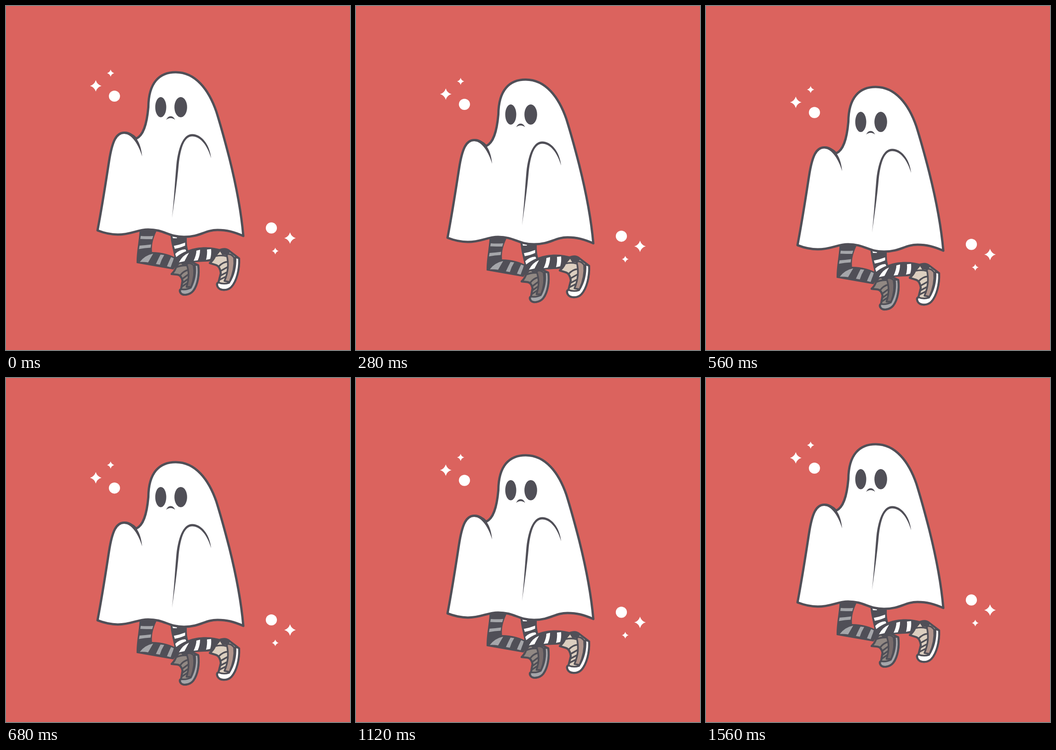
An HTML page with a canvas for the animation above (1.6 s loop, 748x748 px).

```html
<!DOCTYPE html>
<html lang="en">
<head>
<meta charset="utf-8">
<title>Floating ghost</title>
<style>
  html, body { margin: 0; width: 100%; height: 100%; overflow: hidden; background: #db635e; }
  canvas { display: block; width: 748px; height: 748px; }
</style>
</head>
<body>
<canvas id="stage" width="748" height="748"></canvas>
<script>
const ctx = document.getElementById('stage').getContext('2d');
const SIZE = 748, STEP = 40, STEPS = 40, PEAK = 19;
const RED = '#db635e', DARK = '#504f57', WHITE = '#fff', GRAY = '#a5a6aa';
const GHOST_DROP = 43.5, SPARKLE_DROP = 48.4;

const P = d => new Path2D(d);

const body = P(`M199 488 C210 430 217 383 224 338 C231 293 240 275.5 257 275.5
  C268 275.5 276 281 283 288.5 C298 282 306 259 309.5 220 C310 166 334 144 369 144
  C412 144 441 182 457.5 230 C467.5 262 476.500 295 485.500 330 C500 388 511 442 516 500
  C495 491 480 487 460 487 C432 487 423 502 387 502 C352 502 345 486 309 486
  C285 486 273 497 243 497 C226 497 212 493 199 488 Z`);
const creases = P(`M257 273 C275 273 293 290 296 327 C289 303 274 278 257 278 Z
  M361 461 C365 425 367.500 380 370.500 345 C375.500 300 388 278.5 405 278.5
  C424 278.5 443 300 446 331 C437 300 421 283.5 405 283.5
  C389 283.5 380 305 375.500 345 C372 385 366 425 361 461 Z`);
const mouth = P('M348.5 247.5 C352 237 364 237 367.5 247.5 C362 242.5 354 242.5 348.5 247.5 Z');

const backLeg = P(`M291 478 C290 510 284 530 284 559 L364 573 L378 552
  C358 540 338 535 317.500 535 C316 517 321 503 327 490 L327 478 Z`);
const backStripes = P(`M293 500 Q306 501 320 500 L318 507 Q305 507 292 506.5 Z
  M290.500 521 Q303 520 315.500 518.500 L314.500 525.500 Q302 526 289 528.500 Z
  M291 556.500 Q302 542 320 538.500 L309 557.500 Q300 556 291 556.500 Z
  M326 561 Q332 548 336 540.500 L344 541.500 Q338 551 334.500 562.500 Z
  M350 566 Q355 554 359 546 L366 549 Q361 558 358 568 Z`);
const frontLeg = P(`M357 488 C357.500 510 362 525 366 544 L360 566 L376 561
  C400 556 424 557 446 555 L470 530 C448 523 420 522 396 531
  C392 518 393 506 394 488 Z`);
const frontStripes = P(`M362 501 L372 502 L371.500 505 L363 505 Z
  M365 521.500 Q378 519 389.500 514.500 L389.500 521 Q379 526 367 528 Z
  M368 539 Q377 529.500 390 529 L392 533 Q380 538 370 546 Z
  M376 557.500 Q384 542 398 536.500 Q393 545 388 555 Z
  M408 554 Q414 541 414 532 L422 530 Q422 542 417 553 Z
  M435 552 Q438 540 437 529.500 L446 528.500 Q447 540 444 550 Z
  M461 534 L468 533.500 L467.500 540 L461.500 538.500 Z`);

const shoe = {
  outline: P(`M443 559 Q451 553 455 543 L466 530 Q478 526 486 533 L507 549
    C508 572 502 598 490 611 C481 620 465 619 460.500 611 C457 605 459 602 462 601
    L467 581 C466 572 463 565 456 563 Z`),
  quarter: P(`M480 541 Q487 536 496 547 C498 568 493 585 486 600 L475 598
    C482 582 485 562 480 541 Z`),
  sole: P(`M499 546 L507 549 C508 572 502 598 490 611 C481 620 465 619 460.500 611
    Q458 604 461 601 Q473 606 485 602 C494 588 500 568 499 546 Z`),
  heel: P('M464 531 Q477 525 488 535 L480 542 L470 541 Z'),
  lines: P(`M455 544 Q468 541 479 544 M463 566 Q471 557 482 556
    M467 576 L481 568 M467 586 L480 579 M465 595 L477 589`)
};
const backShoeMatrix = new DOMMatrix([0.919, -0.166, 0.075, 0.852, -89, 180.2]);

function fill(path, color) {
  ctx.fillStyle = color;
  ctx.fill(path);
}

function stroke(path, width) {
  ctx.strokeStyle = DARK;
  ctx.lineWidth = width;
  ctx.stroke(path);
}

function ellipse(x, y, rx, ry, color) {
  ctx.fillStyle = color;
  ctx.beginPath();
  ctx.ellipse(x, y, rx, ry, 0, 0, Math.PI * 2);
  ctx.fill();
}

function star(x, y, r) {
  const c = r * 0.23;
  ctx.fillStyle = WHITE;
  ctx.beginPath();
  ctx.moveTo(x, y - r);
  ctx.quadraticCurveTo(x + c, y - c, x + r, y);
  ctx.quadraticCurveTo(x + c, y + c, x, y + r);
  ctx.quadraticCurveTo(x - c, y + c, x - r, y);
  ctx.quadraticCurveTo(x - c, y - c, x, y - r);
  ctx.fill();
}

function drawShoe(matrix, upper, side, rubber) {
  const place = path => {
    const moved = new Path2D();
    moved.addPath(path, matrix);
    return moved;
  };
  const outline = place(shoe.outline);
  fill(outline, upper);
  for (const [part, color] of [[shoe.quarter, side], [shoe.sole, rubber]]) {
    const placed = place(part);
    fill(placed, color);
    stroke(placed, 3.6);
  }
  fill(place(shoe.heel), DARK);
  stroke(place(shoe.lines), 3.6);
  stroke(outline, 4.4);
}

function drawGhost() {
  fill(backLeg, DARK);
  fill(backStripes, GRAY);
  drawShoe(backShoeMatrix, '#918883', '#776b6b', GRAY);
  fill(frontLeg, DARK);
  fill(frontStripes, WHITE);
  drawShoe(new DOMMatrix(), '#dccfc0', '#b0948b', WHITE);
  fill(body, WHITE);
  stroke(body, 5);
  fill(creases, DARK);
  ellipse(336.5, 220, 12, 22, DARK);
  ellipse(380, 220, 13.8, 22, DARK);
  fill(mouth, DARK);
}

function drawSparkles() {
  star(195.2, 173.7, 12.4);
  star(227.5, 146, 7.7);
  ellipse(235.8, 196, 12.1, 12.1, WHITE);
  star(617.6, 504.7, 12.4);
  star(585.5, 532.7, 7.3);
  ellipse(577, 482.7, 12.1, 12.1, WHITE);
}

function lowered(distance, draw) {
  ctx.save();
  ctx.translate(0, distance);
  draw();
  ctx.restore();
}

function render(now) {
  const step = Math.floor(now / STEP) % STEPS;
  const drop = step <= PEAK ? step / PEAK : (STEPS - 1 - step) / (STEPS - 1 - PEAK);
  ctx.fillStyle = RED;
  ctx.fillRect(0, 0, SIZE, SIZE);
  ctx.lineJoin = ctx.lineCap = 'round';
  lowered(drop * GHOST_DROP, drawGhost);
  lowered(drop * SPARKLE_DROP, drawSparkles);
  requestAnimationFrame(render);
}

render(0);
</script>
</body>
</html>
```
